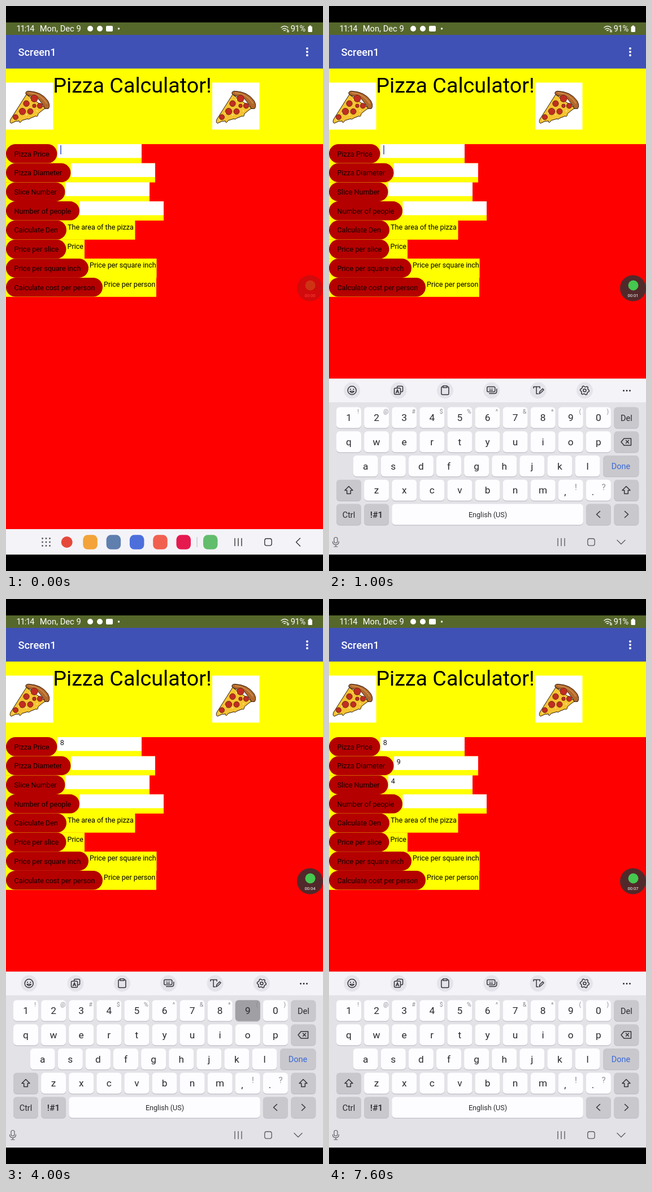
These frames come from a looping animation (561x998 px, 8000 ms). An HTML page:

```html
<!DOCTYPE html>
<html lang="en">
<head>
<meta charset="utf-8">
<title>Pizza Calculator</title>
<style>
  html, body { margin: 0; width: 100%; height: 100%; overflow: hidden; background: #000; }
  svg { display: block; width: 561px; height: 998px; font-family: Roboto, sans-serif; }
  .line { fill: none; stroke: #333338; stroke-width: 1.5; stroke-linecap: round; stroke-linejoin: round; }
  .mid { text-anchor: middle; }
</style>
</head>
<body>
<svg id="stage" viewBox="0 0 561 998"></svg>
<script>
const LOOP = 8000, STEP = 100;
const INK = '#2a2a2e', BAR = '#f4f3f8', KEY = '#fdfcff', DARK = '#c9c8cd', PRESSED = '#a09fa4';

const rect = (x, y, w, h, fill, r = 0, extra = '') =>
  `<rect x="${x}" y="${y}" width="${w}" height="${h}" rx="${r}" fill="${fill}" ${extra}/>`;
const circle = (x, y, r, fill, extra = '') => `<circle cx="${x}" cy="${y}" r="${r}" fill="${fill}" ${extra}/>`;
const text = (x, y, size, str, fill = '#000', extra = '') =>
  `<text x="${x}" y="${y}" font-size="${size}" fill="${fill}" ${extra}>${str}</text>`;
const mid = (x, y, size, str, fill = INK, extra = '') => text(x, y, size, str, fill, `class="mid" ${extra}`);
const line = (d, extra = '') => `<path class="line" d="${d}" ${extra}/>`;
const group = (id, body, extra = '') => `<g id="${id}" ${extra}>${body}</g>`;
const move = (x, y, body) => `<g transform="translate(${x} ${y})">${body}</g>`;

// ---- app screen ----
const ROW_TOP = 244, ROW_H = 33.7;
const rows = [
  // label, pill width, row width, result text
  ['Pizza Price', 90.5, 240],
  ['Pizza Diameter', 114.5, 264],
  ['Slice Number', 104.5, 254],
  ['Number of people', 130, 279],
  ['Calculate Den', 107, 228.5, 'The area of the pizza'],
  ['Price per slice', 106.5, 139, 'Price'],
  ['Price per square inch', 146, 266.5, 'Price per square inch'],
  ['Calculate cost per person', 171, 266, 'Price per person'],
];
const rowY = i => ROW_TOP + i * ROW_H;

function row([label, pill, width, result], i) {
  const y = rowY(i);
  return rect(0, y, width, ROW_H + .2, '#ff0')
    + (result
      ? text(pill + 2, y + 16.2, 12.6, result)
      : rect(pill + .5, y, width - pill - .5, 24.4, '#fff') + text(pill + 5.3, y + 14.4, 12.6, '', '#111', `id="value${i}"`))
    + rect(0, y, pill, ROW_H, '#b50000', ROW_H / 2)
    + text(14.6, y + 21.6, 12.6, label, '#120000');
}

function pizza(x) {
  const pepperoni = [[50, 28, 6.2], [36, 37, 5.2], [60, 41, 4.6], [50, 41, 3.2], [29, 51, 5.8], [43, 51, 5], [17, 61, 4.6]];
  return move(x, 135.3, rect(0, 0, 83.5, 83, '#fff')
    + '<path d="M36 21 8 65Q6 70 9 72L18 68Q21 69 23 67.5 24 74 28 67L38 64Q41 66 43 63L53 59Q56 62 57 55L63 50 70 45Z" fill="#f5c332" stroke="#2a160c"/>'
    + '<path d="M35 20Q34 15 40 15 63 16 74 32 79 41 75 46L69 46 66 40 56 27 40 23Z" fill="#b2682a" stroke="#2a160c"/>'
    + '<path d="M40 18Q62 20 72 37" fill="none" stroke="#d29250" stroke-width="1.6"/>'
    + pepperoni.map(([a, b, r]) => circle(a, b, r, '#c12d22', 'stroke="#6b2410" stroke-width=".9"')).join('')
    + [[43, 30], [23, 54], [36, 57], [55, 50], [13, 66]].map(([a, b]) => circle(a, b, 1.1, '#fff0a0')).join(''));
}

const statusBar = rect(0, 29, 561, 22, '#56672b')
  + text(18.5, 45.2, 14.6, '11:14', '#fff', 'letter-spacing="-1.1"') + text(59.8, 45.2, 14.7, 'Mon, Dec 9', '#fff')
  + circle(149, 40, 5, '#fff') + circle(166, 40, 5, '#fff') + rect(177, 35, 12, 10, '#fff', 2) + circle(199.5, 40, 1.7, '#fff')
  + line('M487 38q6-5 12 0M489 41q4-3 7 0M491.5 43.5q1.5-1 3 0M498 41v5M500 43v3', 'style="stroke:#fff;stroke-width:1.3"')
  + text(503.7, 45.2, 14.6, '91%', '#fff', 'letter-spacing="-.3"') + rect(534.5, 36, 7.5, 10, '#fff', 1.5) + rect(536.5, 34.5, 3.5, 2, '#fff');

const app = rect(0, 0, 561, 998, '#000') + rect(0, 244, 561, 725, '#f00') + statusBar
  + rect(0, 51, 561, 60, '#3f51b5')
  + text(21.5, 88, 18.3, 'Screen1', '#fff', 'font-weight="500"')
  + [75, 81, 87].map(y => circle(533, y, 2, '#fff')).join('')
  + rect(0, 110.5, 561, ROW_TOP - 110.5, '#ff0')
  + pizza(0) + text(83.2, 153.3, 37.7, 'Pizza Calculator!') + pizza(365)
  + rows.map(row).join('')
  + rect(0, 0, 1.8, 16, '#5068c4', 0, 'id="caret"');

const badge = group('badge', circle(538, 498.5, 23, '#52292b') + circle(538.5, 493.5, 9, '#45c84f')
  + mid(538, 513.8, 7.6, '00:00', '#fff', 'id="clock"'));

// ---- keyboard ----
const COL = 49.1, KEY_W = 44, KEY_H = 37;
const HINTS = ['!', '@', '#', '$', '%', '^', '&amp;', '*', '(', ')'];
const keyY = r => 708.5 + r * 42.75;
const key = (x, r, w, fill, body, id = '') =>
  rect(x, keyY(r) + 1.2, w, KEY_H, '#bfbec5', 6) + rect(x, keyY(r), w, KEY_H, fill, 6, id && `id="${id}"`) + body;
const letterRow = (str, x0, r) => [...str].map((c, i) => {
  const x = x0 + i * COL;
  const hint = r ? '' : mid(x + 38.5, 719.5, 10.5, HINTS[i], '#8d8d93');
  return key(x, r, KEY_W, KEY, mid(x + 22, keyY(r) + 24.5, 17.3, c) + hint, r ? '' : 'key' + c);
}).join('');
const darkKey = (x, r, body, w = KEY_W) => key(x, r, w, DARK, body);
const shift = x => line(`M${x} 848.5l-7 7h3.7v6h6.6v-6h3.7z`);

const keys = letterRow('1234567890', 13, 0)
  + darkKey(504.3, 0, mid(526.3, 732.5, 14.5, 'Del'))
  + letterRow('qwertyuiop', 13, 1)
  + darkKey(504.3, 1, line('M517 770l5-6h12.5v12H522zM525.5 767.3l5 5M530.5 767.3l-5 5'))
  + letterRow('asdfghjkl', 42.7, 2)
  + darkKey(485, 2, mid(516.5, 818, 14.5, 'Done', '#3a69d6'), 63.5)
  + darkKey(13, 3, shift(35)) + letterRow('zxcvbnm', 62.1, 3)
  + key(405.8, 3, KEY_W, KEY, mid(418, 864, 17, ',') + mid(437, 855, 15, '!', '#8d8d93'))
  + key(454.9, 3, KEY_W, KEY, mid(467, 864, 17, '.') + mid(486, 855, 15, '?', '#8d8d93'))
  + darkKey(504.3, 3, shift(526))
  + darkKey(13, 4, mid(35, 903.5, 14.5, 'Ctrl')) + darkKey(62.1, 4, mid(84, 904, 15.5, '!#1', INK, 'font-weight="500"'))
  + key(111.3, 4, 338.5, KEY, mid(281, 902.8, 12.6, 'English (US)'))
  + darkKey(454.9, 4, line('M479.5 892.5l-6 5.5 6 5.5')) + darkKey(504.3, 4, line('M523.5 892.5l6 5.5-6 5.5'));

const gear = Array.from({ length: 24 }, (_, i) => {
  const a = i * Math.PI / 12, r = i % 4 < 2 ? 8 : 6.3;
  return (r * Math.cos(a)).toFixed(1) + ' ' + (r * Math.sin(a)).toFixed(1);
}).join('L');
const tools = [
  line('M-7.5 0a7.5 7.5 0 1 0 15 0a7.5 7.5 0 1 0-15 0M-3.7 1.5q3.7 5 7.4 0z') + circle(-2.7, -2, 1.1, INK) + circle(2.7, -2, 1.1, INK),
  line('M-2.5-4v-1.5q0-2 2-2h6q2 0 2 2v6q0 2-2 2h-2M-5.5-4h7q2 0 2 2v7q0 2-2 2h-7q-2 0-2-2v-7q0-2 2-2zM-4.5 4.5l2.5-6 2.5 6M-3.7 2.7h3.4'),
  line('M-3.5-6.5h-1q-2 0-2 2v10q0 2 2 2h9q2 0 2-2v-10q0-2-2-2h-1M-3.5-8h7v3h-7z'),
  line('M-6-6.5h10q2 0 2 2v5q0 2-2 2H-6q-2 0-2-2v-5q0-2 2-2zM-4-3.5h.1M-1-3.5h.1M2-3.5h.1M-4-.5h6M-4 5.5h9q4 0 4-4v-4'),
  line('M-8-4v-2.5H3V-4M-3-6.5V6h3M2 6l1-4 5-5 2 2-5 5z'),
  line(`M${gear}Z`) + circle(0, 0, 2.5, 'none', 'stroke="#333338" stroke-width="1.5"'),
];
const toolbar = group('toolbar', tools.map((t, i) =>
  move(40.7 + i * 82.35, 679, circle(0, 0, 14.5, '#e5e4ea') + t)).join(''));
const suggestions = group('suggest',
  line('M29.5 673.5h10q2.3 0 2.3 2v8q0 2-2.3 2h-10q-2.3 0-2.3-2v-8q0-2 2.3-2zM36 677l-3 2.7 3 2.7')
  + mid(120.5, 686.5, 20, '', INK, 'id="word"') + mid(227.5, 686.5, 20, '', INK, 'id="ordinal"') + mid(334, 686.5, 20, 'I')
  + circle(440, 680, 9.3, '#eeeef0', 'stroke="#a3a3a8" stroke-width="2"')
  + line('M440 680v-6', 'style="stroke-width:1.3"') + line('M440 680v-4.5', 'id="hour"'));

const keyboard = group('keyboard', rect(0, 658.3, 561, 311, '#e3e2e7') + rect(0, 658.3, 561, 41.7, BAR)
  + toolbar + suggestions + [521.5, 527, 532.5].map(x => circle(x, 679.5, 1.4, INK)).join('') + keys);

// ---- taskbar ----
const dots = [64.5, 71, 77.5].map(x => [940.5, 947, 953.5].map(y => circle(x, y, 1.4, '#55555a')).join('')).join('');
const appColors = ['#f3a33a', '#5f7fae', '#4c6fdc', '#f1604f', '#e6194f'];
const taskbar = rect(0, 924, 561, 45, BAR);
const icons = group('icons', dots + circle(107.7, 947, 10, '#e5483a')
  + appColors.map((c, i) => rect(136.3 + i * 41.3, 934.3, 25.5, 25.5, c, 8)).join('')
  + rect(337.5, 938, 1, 18, '#b5b5ba') + rect(349, 934.3, 25.5, 25.5, '#62bd6c', 8));
const nav = group('nav',
  line('M405 940.5v13M411 940.5v13M417 940.5v13', 'style="stroke-width:1.4"')
  + line('M461.5 940.7h5q3.7 0 3.7 3.7v5q0 3.7-3.7 3.7h-5q-3.7 0-3.7-3.7v-5q0-3.7 3.7-3.7z', 'style="stroke-width:1.4"')
  + line('M3.5-7l-7 7 7 7', 'id="back" style="stroke-width:1.4"')
  + group('mic', line('M12 938.5q3 0 3 3v4q0 3-3 3t-3-3v-4q0-3 3-3zM6.5 946q0 5.5 5.5 5.5t5.5-5.5M12 951.5v3.5M9 955h6', 'style="stroke-width:1.2"')));

document.getElementById('stage').innerHTML = app + badge + taskbar + icons + keyboard + nav + rect(0, 969, 561, 29, '#000');
const $ = id => document.getElementById(id);

// ---- timeline ----
const entries = [{ digit: 8, press: 1700 }, { digit: 9, press: 4000 }, { digit: 4, press: 6300 }];
const focus = [0, 3300, 4600, 7100];
const caretOn = [[0, 400], [900, 1400], [1800, 2300], [2800, 3800], [4100, 5100], [5600, 6100], [6400, 6900], [7100, 7600]];
const fades = {
  badge: [[0, .26], [100, .4], [400, 1]],
  icons: [[0, 1], [100, .9], [600, .15], [700, .06], [900, 0]],
  mic: [[300, 0], [600, 1], [1800, 1], [2100, 0], [3300, 0], [3400, 1], [4100, 1], [4300, 0], [4600, 0], [4700, 1], [6400, 1], [6600, 0], [7100, 0], [7200, 1]],
  toolbar: [[1800, 1], [1900, 0], [3500, 0], [3600, 1], [4100, 1], [4200, 0], [4800, 0], [4900, 1], [6400, 1], [6500, 0], [7200, 0], [7300, 1]],
  suggest: [[1800, 0], [2100, 1], [3500, 1], [3600, 0], [4100, 0], [4400, 1], [4800, 1], [4900, 0], [6400, 0], [6700, 1], [7200, 1], [7300, 0]],
  nav: [[700, 1], [1000, .75]],
};

function tween(points, t) {
  const i = points.findIndex(p => p[0] > t);
  if (i < 0) return points[points.length - 1][1];
  if (i === 0) return points[0][1];
  const [t0, a] = points[i - 1], [t1, b] = points[i];
  return a + (b - a) * (t - t0) / (t1 - t0);
}

function draw(t) {
  for (const id in fades) $(id).setAttribute('opacity', tween(fades[id], t));
  $('clock').textContent = '00:0' + Math.floor(t / 1000);

  const left = 1 - tween([[700, 0], [1000, 1]], t);
  $('keyboard').setAttribute('transform', `translate(0 ${311 * left ** 3})`);
  $('back').setAttribute('transform', `translate(517 947) rotate(${tween([[200, 0], [500, -90]], t)})`);

  entries.forEach(({ digit, press }, i) => {
    const typed = t >= press + STEP;
    $('value' + i).textContent = typed ? digit : '';
    $('key' + digit).setAttribute('fill', t === press ? PRESSED : KEY);
    if (typed) {
      $('word').textContent = digit;
      $('ordinal').textContent = digit + 'th';
      $('hour').setAttribute('transform', `rotate(${digit * 30} 440 680)`);
    }
  });

  const field = focus.filter(f => f <= t).length - 1;
  const filled = field < entries.length && t >= entries[field].press + STEP;
  $('caret').setAttribute('x', rows[field][1] + 5.6 + (filled ? 7.4 : 0));
  $('caret').setAttribute('y', rowY(field) + 2);
  $('caret').setAttribute('opacity', caretOn.some(([a, b]) => t >= a && t < b) ? 1 : 0);
}

const start = performance.now();
function tick() {
  const t = (performance.now() - start) % LOOP;
  draw(Math.floor(t / STEP) * STEP);
  requestAnimationFrame(tick);
}
tick();
</script>
</body>
</html>
```
